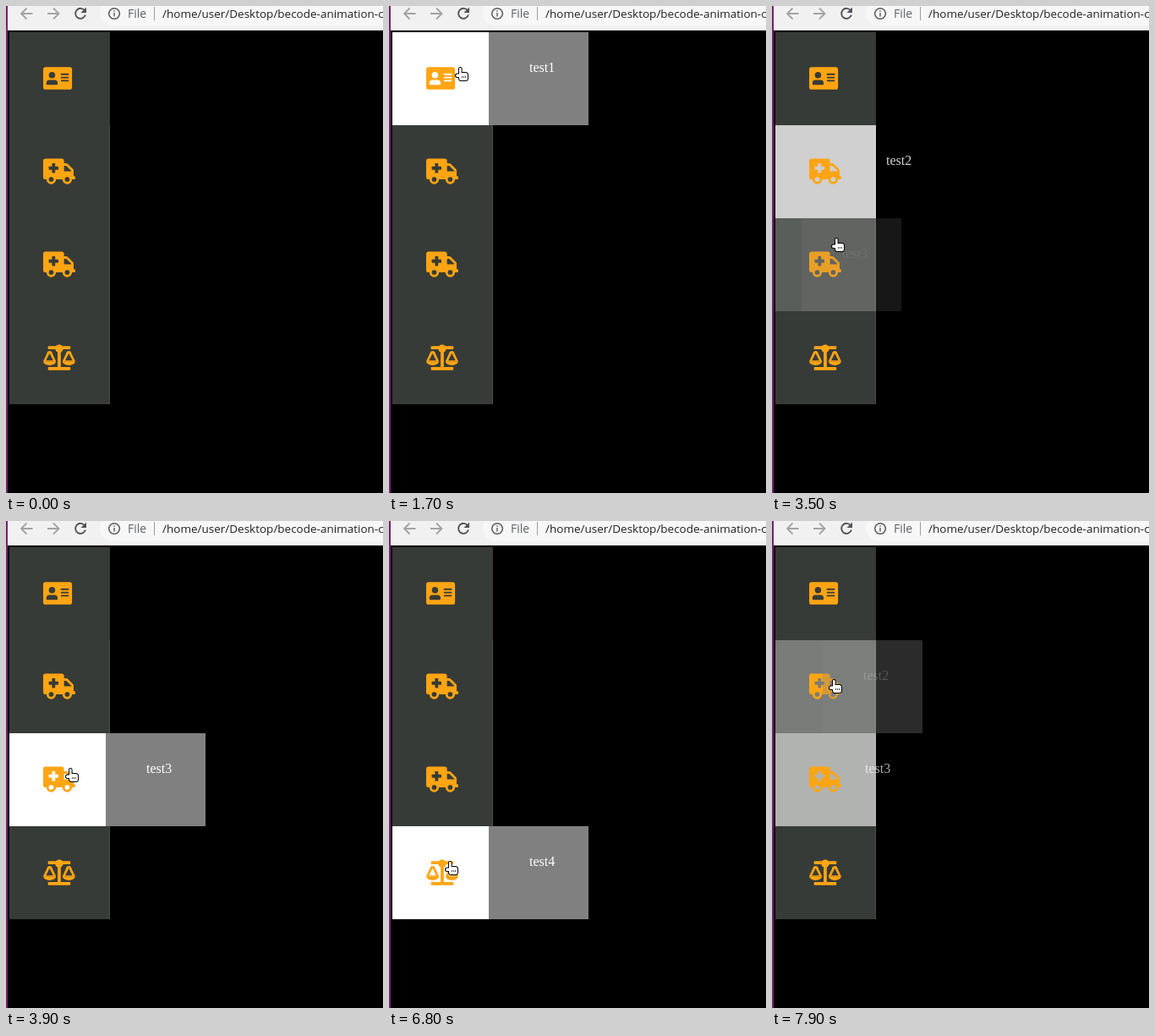
An HTML page with a canvas for the animation above (8000 ms loop, 446 by 576 pixels).

```html
<!DOCTYPE html>
<html lang="en">
<head>
<meta charset="utf-8">
<title>Sliding menu</title>
<style>
  html, body { margin: 0; overflow: hidden; background: #000; }
  canvas { display: block; }
</style>
</head>
<body>
<canvas id="stage" width="446" height="576"></canvas>
<script>
const ctx = document.getElementById('stage').getContext('2d');
const LOOP = 8000, STEP = 100, FADE = 400;
const LEFT = 4, TOP = 31, ROW = 110, WIDTH = 119, PANEL = 118, SLIDE = 114;

// Each visit: the time the pointer enters a row, and the x where it rests
const visits = [
  { time: 630, row: 0, x: 78 },
  { time: 1996, row: 1, x: 71 },
  { time: 3430, row: 2, x: 70 },
  { time: 5030, row: 3, x: 66 },
  { time: 7250, row: 2, x: 67 },
  { time: 7766, row: 1, x: 67 }
];
const offstage = { row: -0.8, x: 98 };
const POINTER_SHOWN = 500, MOVE_LEAD = 300, MOVE_TIME = 500;

const clamp = v => Math.max(0, Math.min(1, v));
const easeOut = v => 1 - (1 - v) ** 1.65;
const smooth = v => v * v * (3 - 2 * v);

// Icons are painted once on a 512-unit grid; "cut" parts are punched out
function makeIcon(paint) {
  const canvas = document.createElement('canvas');
  canvas.width = canvas.height = 40;
  const g = canvas.getContext('2d');
  g.translate(0, 0.4);
  g.scale(0.0592, 0.0592);
  g.fillStyle = '#ffa514';
  const fill = (trace, cut) => {
    g.globalCompositeOperation = cut ? 'destination-out' : 'source-over';
    g.beginPath();
    trace();
    g.fill();
  };
  paint({
    box: (x, y, w, h, r, cut) => fill(() => g.roundRect(x, y, w, h, r), cut),
    disc: (x, y, r, cut) => fill(() => g.arc(x, y, r, 0, 2 * Math.PI), cut),
    bowl: (x, y, rx, ry) => fill(() => g.ellipse(x, y, rx, ry, 0, 0, Math.PI)),
    shape: (d, cut) => {
      g.globalCompositeOperation = cut ? 'destination-out' : 'source-over';
      g.fill(new Path2D(d));
    }
  });
  return canvas;
}

const card = makeIcon(({ box, disc }) => {
  box(0, 32, 576, 448, 48);
  disc(176, 192, 64, true);
  box(64, 288, 224, 96, [60, 60, 20, 20], true);
  for (let i = 0; i < 3; i++) box(352, 160 + 64 * i, 160, 32, 8, true);
});

const truck = makeIcon(({ box, disc, shape }) => {
  box(0, 0, 416, 416, 48);
  box(380, 352, 260, 64, 16);
  shape('M400 96H460Q480 96 494 110L594 210Q608 224 608 244V400H400z');
  shape('M416 144H460L560 244V256H416z', true);
  box(176, 96, 64, 192, 8, true);
  box(112, 160, 192, 64, 8, true);
  for (const x of [160, 480]) {
    disc(x, 416, 96);
    disc(x, 416, 48, true);
  }
});

const scales = makeIcon(({ box, disc, bowl, shape }) => {
  box(96, 32, 448, 64, 16);
  box(96, 448, 448, 64, 16);
  box(288, 80, 64, 400, 0);
  disc(320, 80, 80);
  for (const x of [128, 512]) {
    bowl(x, 335, 128, 80);
    disc(x, 176, 48);
    shape(`M${x - 128} 336L${x - 43} 154H${x + 43}L${x + 128} 336z`);
    shape(`M${x} 176l72 144h-144z`, true);
  }
});

const icons = [card, truck, truck, scales];

const hand = new Path2D();
hand.roundRect(5, 1, 2.6, 12, 1.3);
hand.roundRect(5, 7, 10, 9, 2.5);
hand.roundRect(1, 8.5, 6, 3.5, 1.7);

function rect(color, x, y, w, h, alpha = 1) {
  ctx.globalAlpha = alpha;
  ctx.fillStyle = color;
  ctx.fillRect(x, y, w, h);
  ctx.globalAlpha = 1;
}

function text(value, x, y, font, color, alpha = 1) {
  ctx.globalAlpha = alpha;
  ctx.font = font;
  ctx.fillStyle = color;
  ctx.fillText(value, x, y);
  ctx.globalAlpha = 1;
}

function line(d, color, width) {
  ctx.strokeStyle = color;
  ctx.lineWidth = width;
  ctx.stroke(new Path2D(d));
}

function rowState(row, t) {
  let state = { active: false, level: 0, shift: 0 };
  visits.forEach((visit, i) => {
    if (visit.row !== row || t < visit.time) return;
    const end = visits[i + 1]?.time ?? LOOP;
    const active = t < end;
    const p = clamp((t - (active ? visit.time : end)) / FADE);
    state = active
      ? { active, level: p, shift: easeOut(p) }
      : { active, level: 1 - p, shift: 1 - easeOut(p) };
  });
  return state;
}

function drawToolbar() {
  rect('#f2f1f1', 2, 0, 444, 28);
  ctx.fillStyle = '#f7f7f7';
  ctx.beginPath();
  ctx.roundRect(111, -6, 400, 29, 14);
  ctx.fill();
  rect('#d8d6d5', 2, 28, 444, 1);
  line('M31.5 9H18M24.5 2.5L18 9l6.5 6.5M49 9h13.5M56 2.5L62.5 9 56 15.5', '#a3a3a3', 1.8);
  line('M93 5.3A6 6 0 1 0 93.9 10.5', '#505357', 1.9);
  ctx.fillStyle = '#505357';
  ctx.fill(new Path2D('M95 1.5V8H88.5z'));
  line('M128 2.7a6.3 6.3 0 1 0 .1 0zM128 8v4.6M128 5.2v1.6', '#5f6368', 1.5);
  text('File', 144, 14, '14px "Open Sans", sans-serif', '#5f6368');
  rect('#9a9da0', 175, 1, 1, 16);
  text('/home/user/Desktop/becode-animation-c', 185, 14, '13.5px "Open Sans", sans-serif', '#202124');
}

function drawRow(row, t) {
  const { active, level, shift } = rowState(row, t);
  const y = TOP + row * ROW, x = Math.round(LEFT + SLIDE * shift);
  rect('#fff', LEFT, y, WIDTH, ROW, active ? level : level * 0.92);
  ctx.drawImage(icons[row], 44, y + 39);
  if (active) rect('#808080', x, y, PANEL, ROW, level);
  // Over its half-faded panel the label needs less ink to match the shared opacity
  const ink = active ? level / (2 - level) : level;
  text('test' + (row + 1), x + 48, y + 47, '16px "Liberation Serif", serif', '#fff', ink);
}

function drawPointer(t) {
  if (t < POINTER_SHOWN) return;
  const i = visits.findLastIndex(visit => t >= visit.time - MOVE_LEAD);
  const from = visits[i - 1] ?? offstage, to = visits[i];
  const p = smooth(clamp((t - to.time + MOVE_LEAD) / MOVE_TIME));
  const mix = key => from[key] + (to[key] - from[key]) * p;
  ctx.save();
  ctx.translate(Math.round(mix('x')), Math.round(TOP + 41 + ROW * mix('row')));
  ctx.strokeStyle = '#000';
  ctx.lineWidth = 2;
  ctx.stroke(hand);
  ctx.fillStyle = '#fff';
  ctx.fill(hand);
  for (let k = 0; k < 3; k++) rect('#000', 8 + 2 * k, 11, 1, 2, 0.7);
  ctx.restore();
}

function draw() {
  const t = Math.floor(performance.now() % LOOP / STEP) * STEP;
  rect('#000', 0, 0, 446, 576);
  rect('#77216f', 0, 0, 2, 576);
  drawToolbar();
  rect('#373b37', LEFT, TOP, WIDTH, ROW * 4);
  rect('#4a4e4a', LEFT + WIDTH - 1, TOP + ROW, 1, ROW * 3);
  for (let row = 0; row < icons.length; row++) drawRow(row, t);
  drawPointer(t);
  requestAnimationFrame(draw);
}
draw();
</script>
</body>
</html>
```
